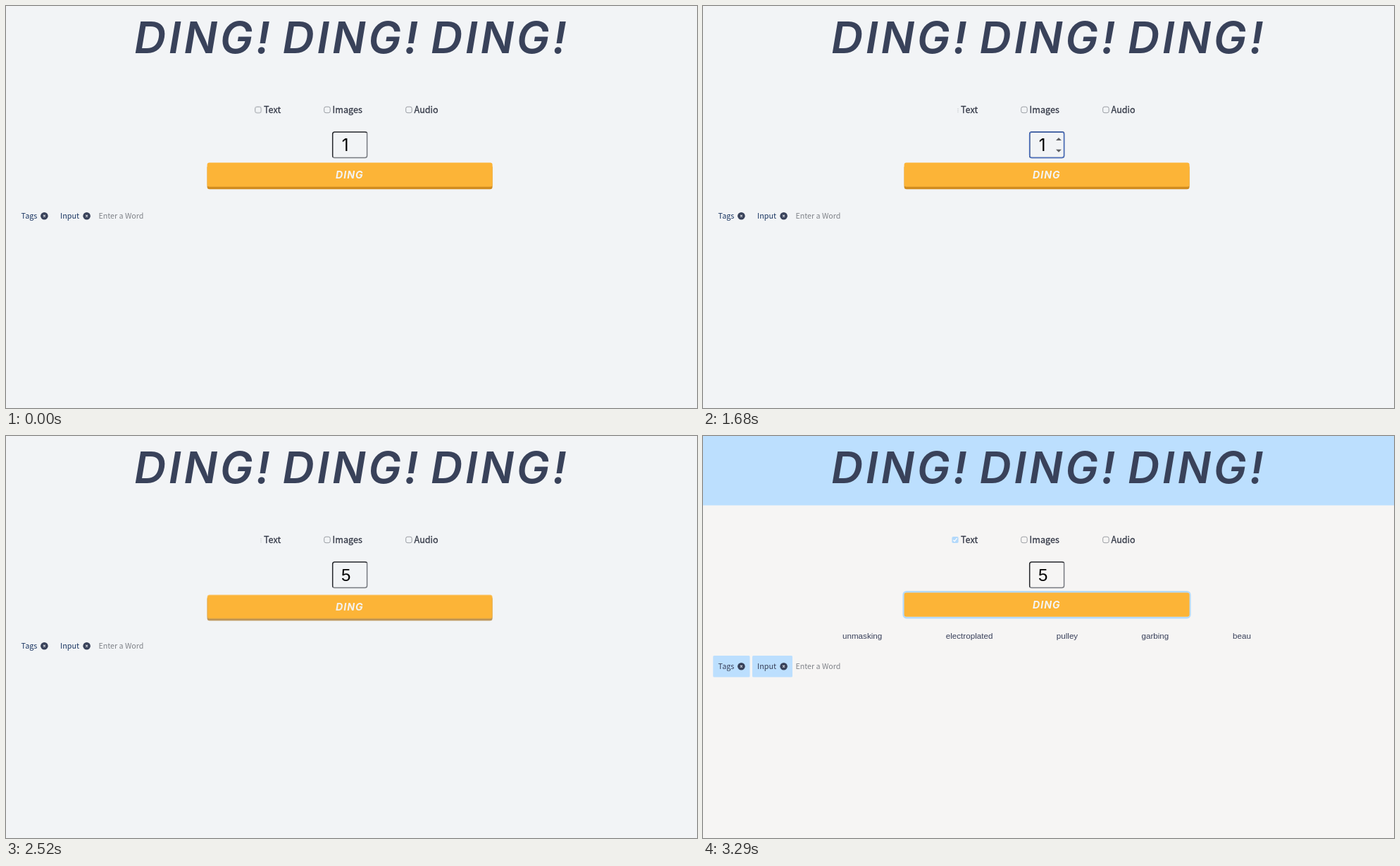
Write an HTML page that moves like this. It is 981 px wide and 571 px high and loops after 3360 ms.

```html
<!DOCTYPE html>
<html lang="en">
<head>
<meta charset="utf-8">
<title>Ding! Ding! Ding!</title>
<style>
html, body { margin: 0; width: 100%; height: 100%; overflow: hidden; background: #f2f4f6; }
svg { display: block; width: 100vw; height: 100vh; }

.title, .ding { font-family: Inter, Lato, sans-serif; font-style: italic; }
.title { font-size: 62.5px; font-weight: 600; letter-spacing: 4px; fill: #39425a; }
.ding { font-size: 14.2px; font-weight: 700; letter-spacing: 1px; fill: #f4f4f4; }
.label, .tag, .hint { font-family: "Noto Sans CJK JP", "Noto Sans CJK SC", "Noto Sans", sans-serif; }
.label { font-size: 12.6px; font-weight: 500; fill: #363b49; stroke: #363b49; stroke-width: .3px; }
.tag { font-size: 10.8px; font-weight: 500; }
.hint { font-size: 10.7px; fill: #7f8288; }
.num, .word { font-family: "Liberation Sans", Arial, sans-serif; }
.num { font-size: 24px; }
.one { font-family: Inter, sans-serif; }
.word { font-size: 11.64px; fill: #39405a; }

/* every change is a hard cut on a 3360 ms loop */
.bg, .head, .chip, .tag, .tags, .words, .plain, .faint, .check, .tick, .spin,
.focus, .one, .five, .press, .lip, .ring { animation: 3360ms step-end infinite; }

.bg { animation-name: bg; }
.head, .chip, .tick { animation-name: late; }
.tag { animation-name: tag; }
.tags { animation-name: drop; }
.words { animation-name: words; }
.plain { animation-name: plain; }
.faint { animation-name: faint; }
.check { animation-name: check; }
.spin { animation-name: spin; }
.focus { animation-name: focus; }
.one { animation-name: one; }
.five { animation-name: five; }
.press { animation-name: press; }
.lip { animation-name: lip; }
.ring { animation-name: ring; }
.press, .lip { transform-origin: 488px 240px; }

@keyframes bg { 0% { fill: #f2f4f6 } 77.08%, to { fill: #f6f5f4 } }
@keyframes late { 0% { opacity: 0 } 77.08%, to { opacity: 1 } }
@keyframes tag { 0% { fill: #1c3763 } 77.08%, to { fill: #39405a } }
@keyframes drop { 0% { transform: none } 87.49%, to { transform: translateY(29px) } }
@keyframes words { 0% { opacity: 0 } 87.49%, to { opacity: 1 } }
@keyframes plain { 0% { opacity: 1 } 18.74%, to { opacity: 0 } }
@keyframes faint { 0% { opacity: 0 } 18.74% { opacity: 1 } 77.08%, to { opacity: 0 } }
@keyframes check { 0% { fill: transparent } 77.08% { fill: #3b7ee2 } 87.49%, to { fill: #b3d9fb } }
@keyframes spin { 0% { opacity: 0 } 33.33% { opacity: 1 } 60.41%, to { opacity: 0 } }
@keyframes focus { 0% { opacity: 0 } 39.58% { opacity: 1 } 62.49%, to { opacity: 0 } }
@keyframes one { 0% { opacity: 1 } 54.16%, to { opacity: 0 } }
@keyframes five { 0% { opacity: 0 } 54.16%, to { opacity: 1 } }
@keyframes press {
  0% { transform: none }
  62.49% { transform: translateY(2.9px) scale(.9965, .98) }
  70.83% { transform: translateY(2.9px) scale(.999, .98) }
  77.08%, to { transform: none }
}
@keyframes lip {
  0% { fill: #d18c1f; transform: none }
  62.49% { fill: #ce8931; transform: translateY(2.1px) scaleX(.9965) }
  70.83% { fill: #bd9558; transform: translateY(2.1px) }
  77.08%, to { fill: transparent; transform: none }
}
@keyframes ring {
  0% { stroke: transparent }
  77.08% { stroke: #98c6f1 }
  87.49%, to { stroke: #b5dbfd }
}
</style>
</head>
<body>
<svg viewBox="0 0 981 571" preserveAspectRatio="none">
  <defs>
    <rect id="box" x=".5" y=".5" width="8.5" height="8.5" rx="2.4" fill="none" stroke="#7d8188" stroke-width=".75"/>
    <g id="close">
      <circle r="5.3" fill="#39425a"/>
      <path d="M-1.4-1.4 1.4 1.4M1.4-1.4-1.4 1.4" stroke="#f2f4f6" stroke-width="1.1"/>
    </g>
  </defs>

  <rect class="bg" width="981" height="571"/>
  <rect class="head" width="981" height="98.5" fill="#bcdffe"/>
  <g class="title">
    <text x="182" y="67.3">DING!</text>
    <text x="392.5" y="67.3">DING!</text>
    <text x="603" y="67.3">DING!</text>
  </g>

  <use href="#box" class="plain" x="353.2" y="142.7"/>
  <path class="faint" d="M362 145.5v6" stroke="#b5b8bd" stroke-width=".8" stroke-dasharray="1.5 1"/>
  <rect class="check" x="353.4" y="142.9" width="9.2" height="9.2" rx="1.8"/>
  <path class="tick" d="M355.4 147.7l1.8 1.9 3.4-4.4" fill="none" stroke="#fff" stroke-width="1.3"/>
  <use href="#box" x="451.2" y="142.7"/>
  <use href="#box" x="567.2" y="142.7"/>
  <g class="label">
    <text x="366" y="152">Text</text>
    <text x="463.6" y="152">Images</text>
    <text x="579.6" y="152">Audio</text>
  </g>

  <g fill="none" stroke-width="1.5">
    <path d="M512.3 179.3q.3.7.3 2V212.5q0 3-3 3H466.5q-1.5 0-2.2-.7" stroke="#777a80"/>
    <path d="M464.3 214.8q-.6-.7-.6-2.3V182q0-3 3-3H509.6q1.8 0 2.7.7" stroke="#25262b"/>
    <rect class="focus" x="463.7" y="179" width="48.9" height="36.5" rx="3" stroke="#4a6fc0"/>
  </g>
  <g class="num">
    <text class="one" x="476.8" y="206">1</text>
    <text class="five" x="476" y="206">5</text>
  </g>
  <path class="spin" d="M501 191l4-4 4 4zM501 203.8l4 4 4-4z" fill="#5f6064"/>

  <rect class="lip" x="285.6" y="226" width="405" height="34.3" rx="3.5"/>
  <rect class="ring" x="284.9" y="221.5" width="406.2" height="36.4" rx="4" fill="none" stroke-width="3"/>
  <g class="press">
    <rect x="285.6" y="222.6" width="405" height="34.2" rx="3.2" fill="#fcb437"/>
    <text class="ding" x="468" y="244.8">DING</text>
  </g>

  <g class="words word">
    <text x="198" y="287.6">unmasking</text>
    <text x="344.8" y="287.6">electroplated</text>
    <text x="501.8" y="287.6">pulley</text>
    <text x="622.5" y="287.6">garbing</text>
    <text x="752" y="287.6">beau</text>
  </g>

  <g class="tags">
    <rect class="chip" x="14.3" y="283" width="52.2" height="30.5" rx="1.5" fill="#bcdffe"/>
    <rect class="chip" x="70" y="283" width="57" height="30.5" rx="1.5" fill="#bcdffe"/>
    <text class="tag" x="21.6" y="302">Tags</text>
    <text class="tag" x="77" y="302">Input</text>
    <use href="#close" x="54.4" y="298.2"/>
    <use href="#close" x="114.6" y="298.2"/>
    <text class="hint" x="131.4" y="302">Enter a Word</text>
  </g>
</svg>
</body>
</html>
```
